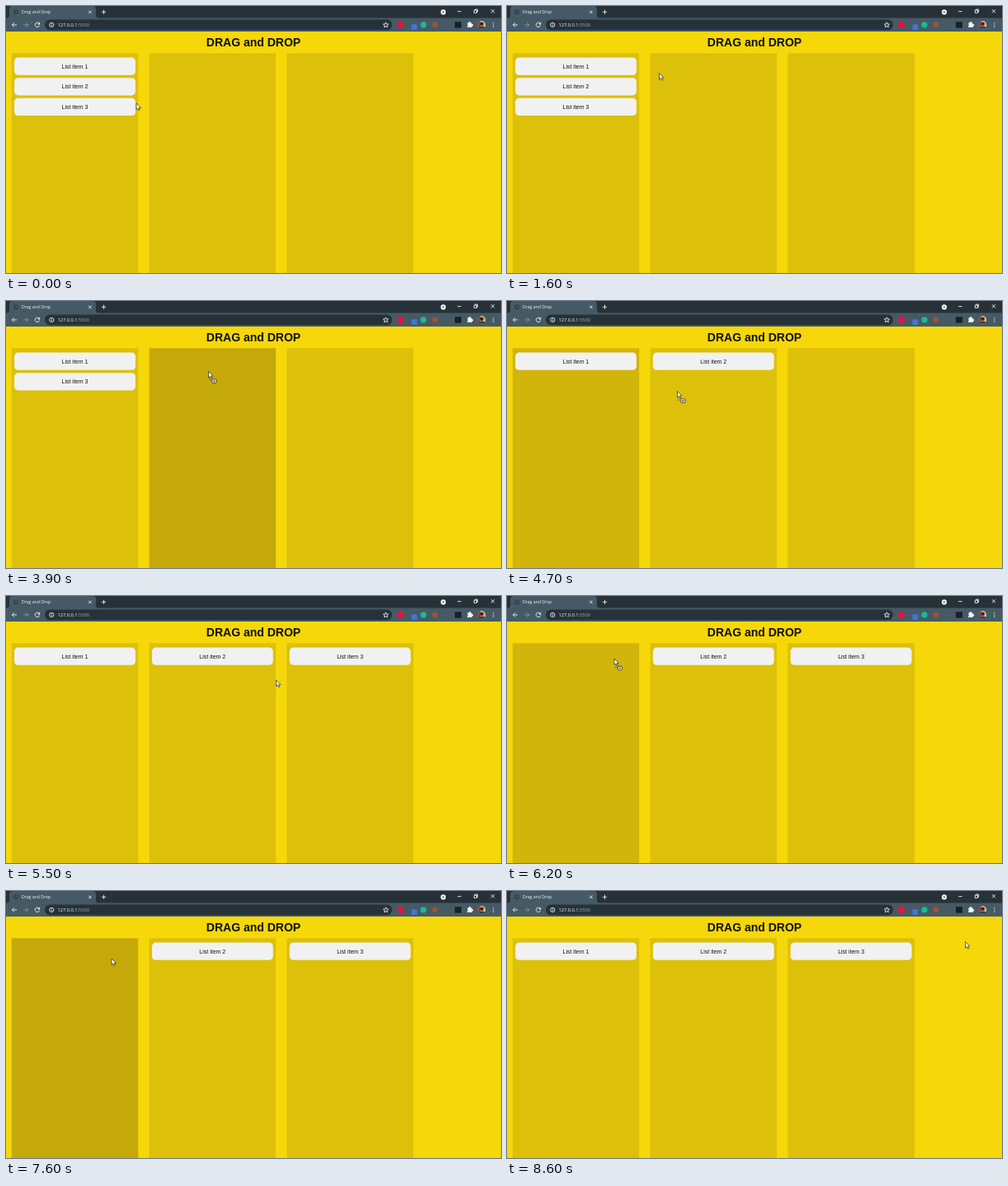
Animation of 600x324 px, one loop 8.8 s. Source, as an HTML page:

```html
<!DOCTYPE html>
<html lang="en">
<head>
<meta charset="utf-8">
<title>Drag and Drop</title>
<style>
  html, body { margin: 0; width: 100%; height: 100%; overflow: hidden; background: #f5d70a; }
  svg { display: block; width: 100%; height: 100%; }
  .page { font-family: "Liberation Sans", Arial, sans-serif; text-anchor: middle; fill: #111; }
  .ui { font-family: "Open Sans", sans-serif; fill: #f4f6f7; }
  .line { fill: none; stroke: #eef1f2; stroke-width: .9; }
</style>
</head>
<body>
<svg viewBox="0 0 600 324">
  <rect width="600" height="324" fill="#f5d70a"/>

  <!-- tab strip -->
  <rect width="600" height="15" fill="#263238"/>
  <path d="M0 15Q4 15 4 11V4Q4 0 8 0H105Q109 0 109 4V11Q109 15 113 15Z" fill="#455a64"/>
  <circle cx="12" cy="7.3" r="2.6" fill="none" stroke="#2b3940" stroke-width="1"/>
  <path d="M10.3 6.3L12.3 7.3L11.6 9.2" fill="none" stroke="#2b3940" stroke-width=".8"/>
  <text class="ui" x="19" y="9.2" font-size="5.15">Drag and Drop</text>
  <path class="line" d="M100.2 5.7L103.6 9.1M103.6 5.7L100.2 9.1M118.5 4.7V9.9M115.9 7.3H121.1"/>
  <circle cx="530" cy="7.4" r="3.1" fill="#f4f6f7"/>
  <path d="M528.5 6.7H531.5L530 8.6Z" fill="#263238"/>
  <path class="line" stroke-width=".7" d="M547.3 6.6H551.7M567.3 5.2H570.5V8.4H567.3ZM568.4 5V4.1H571.6V7.3H570.6M588 4.2L592 8.4M592 4.2L588 8.4"/>

  <!-- toolbar -->
  <rect y="14.5" width="600" height="16.5" fill="#455a64"/>
  <rect x="47" y="16.5" width="421" height="12.8" rx="6.4" fill="#263238"/>
  <path class="line" d="M13 22.9H7.4M10 20.2L7.3 22.9L10 25.6"/>
  <path class="line" opacity=".4" d="M21.2 22.9H26.8M24.2 20.2L26.9 22.9L24.2 25.6"/>
  <path class="line" d="M40.2 21.3A2.7 2.7 0 1 0 40.6 23.6"/>
  <path d="M41.1 19.6V22.4H38.3Z" fill="#eef1f2"/>
  <circle class="line" cx="55.3" cy="22.9" r="2.6" stroke-width=".7"/>
  <path class="line" stroke-width=".7" d="M55.3 22.5V24.4M55.3 21.2V21.9"/>
  <text class="ui" x="62.4" y="25" font-size="5.7">127.0.0.1<tspan fill="#a3adb2">:5500</tspan></text>
  <path class="line" stroke-width=".6" d="M460.4 19.8L461.3 21.9L463.5 22.1L461.8 23.6L462.3 25.8L460.4 24.6L458.5 25.8L459 23.6L457.3 22.1L459.5 21.9Z"/>
  <circle cx="478" cy="22.8" r="4.2" fill="#df1743"/>
  <rect x="491.5" y="22.3" width="6.6" height="6.6" fill="#3c78dc"/>
  <circle cx="506" cy="22.8" r="3.6" fill="#17bd92"/>
  <circle cx="520" cy="22.8" r="3.2" fill="#a9502c"/>
  <rect x="544" y="19.2" width="8" height="7.4" fill="#1b2023"/>
  <path d="M559.3 20.6H561A1.2 1.2 0 1 1 563.2 20.6H564.6V22.2A1.2 1.2 0 1 1 564.6 24.4V26.1H562.9A1.1 1.1 0 0 0 560.9 26.1H559.3V24.3A1.1 1.1 0 0 0 559.3 22.3Z" fill="#f4f6f7"/>
  <clipPath id="face"><circle cx="576.5" cy="22.9" r="4.8"/></clipPath>
  <g clip-path="url(#face)">
    <rect x="571" y="18" width="11" height="10" fill="#d7b78e"/>
    <rect x="571" y="18" width="4" height="10" fill="#a43b31"/>
    <circle cx="576.7" cy="21.8" r="2.2" fill="#3a2823"/>
    <ellipse cx="577" cy="27.6" rx="4" ry="3.2" fill="#27414a"/>
  </g>
  <g fill="#f4f6f7">
    <circle cx="590.7" cy="20.6" r=".65"/><circle cx="590.7" cy="22.9" r=".65"/><circle cx="590.7" cy="25.2" r=".65"/>
  </g>

  <!-- page -->
  <text class="page" x="300" y="49.2" font-size="14" font-weight="700">DRAG and DROP</text>
  <g id="columns"></g>
  <g id="items" class="page" font-size="7"></g>

  <g id="cursor">
    <path d="M0 0V7.6L1.8 6L3 8.7L4.3 8.1L3.1 5.5H5.4Z" fill="#fff" stroke="#1a1a1a" stroke-width=".65" stroke-linejoin="round"/>
    <g id="badge">
      <path d="M1.5 8.6V11H4M2.6 7.4L5 9" fill="none" stroke="#333" stroke-width=".6" stroke-dasharray=".8 .6"/>
      <rect x="4.4" y="9.3" width="5" height="4.6" rx=".5" fill="#fff" stroke="#222" stroke-width=".8"/>
      <path d="M6.9 10.4V12.8M5.7 11.6H8.1" stroke="#222" stroke-width=".75"/>
    </g>
  </g>
</svg>
<script>
const LOOP = 8800, STEP = 100, FADE = 200;
const COL_X = [6.8, 173.6, 340.4];
const NORMAL = [221, 192, 10], DARK = [197, 169, 10];

// time, then the items held by each column
const layout = [
  [0, '123', '', ''], [3200, '13', '', ''], [4100, '13', '2', ''],
  [4500, '1', '2', ''], [5300, '1', '2', '3'], [6200, '', '2', '3'],
  [6700, '', '21', '3'], [7200, '', '2', '3'], [7700, '1', '2', '3']
];
// column, enter time, leave time
const hovers = [
  [1, 3400, 4000], [0, 4400, 4600], [1, 4700, 4900], [2, 4900, 5200],
  [0, 6100, 6300], [1, 6300, 6600], [1, 7100, 7300], [0, 7300, 7600]
];
const drags = [[3200, 4000], [4500, 5200], [6200, 6600], [7200, 7600]];
// time, x, y of the pointer tip
const path = [
  [0, 158, 118], [600, 158, 118], [1000, 176, 156], [1600, 184.5, 81.5],
  [2000, 230, 112], [2500, 270, 100], [3000, 110, 97], [3200, 112, 98],
  [3900, 245.5, 85.5], [4100, 245, 87], [4400, 118, 96], [4500, 124, 98],
  [4700, 206.5, 109.5], [5200, 392, 98], [5300, 385, 99], [5500, 327.5, 102],
  [6000, 128, 76], [6200, 130, 76], [6600, 252, 98], [6800, 253, 100.5],
  [7100, 250, 97], [7600, 128, 82], [7900, 140, 80], [8600, 555.5, 61.5]
];

const $ = id => document.getElementById(id);
const clamp = v => Math.max(0, Math.min(1, v));

function add(parent, tag, attrs) {
  const el = document.createElementNS('http://www.w3.org/2000/svg', tag);
  for (const key in attrs) el.setAttribute(key, attrs[key]);
  return parent.appendChild(el);
}

const columns = COL_X.map(x =>
  add($('columns'), 'rect', { x, y: 57.3, width: 153.4, height: 267 }));

const items = [1, 2, 3].map(n => {
  const g = add($('items'), 'g', {});
  add(g, 'rect', { x: 3.3, y: 0, width: 146.8, height: 21.2, rx: 4.5, fill: '#f1f1f1' });
  add(g, 'text', { x: 76.7, y: 13.1 }).textContent = 'List item ' + n;
  return g;
});

function pointer(t) {
  const i = path.findIndex(p => p[0] > t);
  if (i < 0) return path[path.length - 1].slice(1);
  const [a, b] = [path[i - 1], path[i]];
  const k = (t - a[0]) / (b[0] - a[0]);
  return [a[1] + (b[1] - a[1]) * k, a[2] + (b[2] - a[2]) * k];
}

function draw(t) {
  const held = layout.filter(s => s[0] <= t).pop().slice(1);
  items.forEach((g, i) => {
    const col = held.findIndex(s => s.includes(i + 1));
    g.style.display = col < 0 ? 'none' : '';
    if (col < 0) return;
    const row = held[col].indexOf(i + 1);
    g.setAttribute('transform', `translate(${COL_X[col]} ${62.6 + row * 24.6})`);
  });

  columns.forEach((rect, i) => {
    const k = Math.max(0, ...hovers.filter(h => h[0] === i)
      .map(h => clamp((t - h[1]) / FADE) - clamp((t - h[2]) / FADE)));
    const rgb = NORMAL.map((c, j) => Math.round(c + (DARK[j] - c) * k));
    rect.setAttribute('fill', `rgb(${rgb})`);
  });

  $('cursor').setAttribute('transform', `translate(${pointer(t)})`);
  $('badge').style.display = drags.some(d => t >= d[0] && t < d[1]) ? '' : 'none';
}

const start = performance.now();
function tick() {
  const t = (performance.now() - start) % LOOP;
  draw(Math.floor(t / STEP) * STEP);
  requestAnimationFrame(tick);
}
tick();
</script>
</body>
</html>
```
